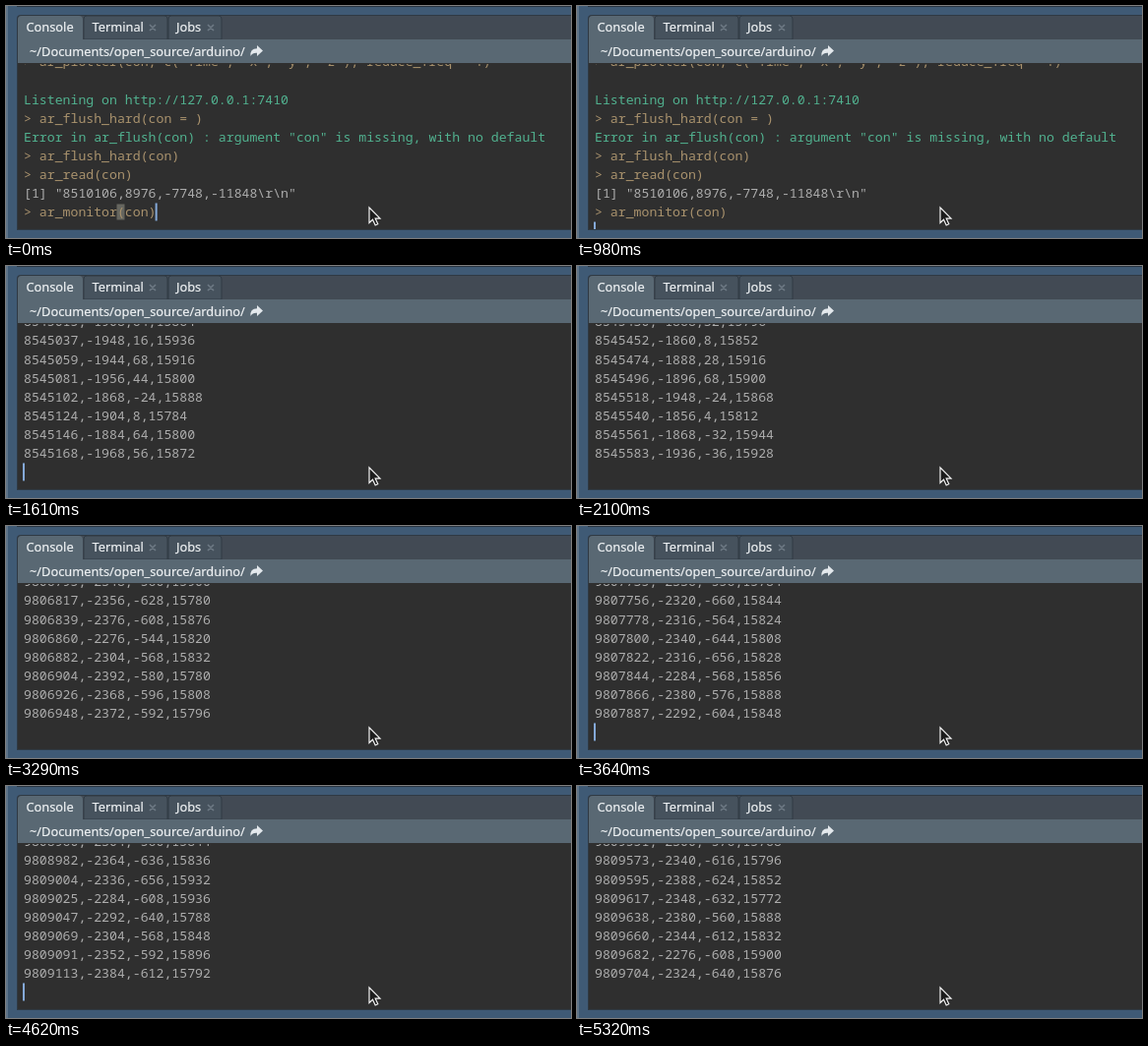
An HTML page that plays this animation: 574x236 px, repeating every 5.53 s.

```html
<!DOCTYPE html>
<html lang="en">
<head>
<meta charset="utf-8">
<title>Console monitor</title>
<style>
  html, body { margin: 0; width: 100%; height: 100%; overflow: hidden; background: #3f5a75; }
  svg { display: block; width: 574px; height: 236px; }
  text { white-space: pre; }
  .ui { font: 12.8px "Noto Sans", "Open Sans", sans-serif; fill: #eef1f3; stroke: #eef1f3; stroke-width: .2; }
  .mono { font: 13.2px "Noto Sans Mono", "DejaVu Sans Mono", monospace; }
  .input { fill: #a9926d; }
  .message { fill: #51b18f; }
  .output { fill: #adadad; }
</style>
</head>
<body>
<svg viewBox="0 0 574 236">
  <clipPath id="view"><rect x="12" y="59" width="562" height="168"/></clipPath>
  <rect width="574" height="236" fill="#3f5a75"/>
  <path d="M0 0h2v236H0z" fill="#5f7488"/>
  <path d="M11 0H574V1H11z" fill="#27333f"/>
  <path d="M11 228V13q0-4 4-4H574V228z" fill="#2f3943"/>
  <path d="M12 35V14q0-4 4-4H574V35z" fill="#424a54"/>
  <path d="M79 34V13q0-3 3-3h79q3 0 3 3v21zM165 34V13q0-3 3-3h48q3 0 3 3v21z" fill="#46525d" stroke="#303b45"/>
  <path d="M12 58V14q0-4 4-4H74q4 0 4 4V34H574V58z" fill="#596873"/>
  <rect x="12" y="58" width="562" height="169" fill="#2f2f2f"/>
  <g class="ui">
    <text x="20.5" y="26">Console</text>
    <text x="87.5" y="26">Terminal</text>
    <text x="173" y="26">Jobs</text>
    <text x="24" y="51">~/Documents/open_source/arduino/</text>
  </g>
  <path d="M146 19l6 6m0-6l-6 6M205 19l6 6m0-6l-6 6" stroke="#6d7984" stroke-width="1.6"/>
  <path d="M255 40l6 5.5-6 5.5v-3.2q-4.5-.4-6.5 3.2-1-7.5 6.5-7.8z" fill="#e3e8ec"/>
  <g clip-path="url(#view)">
    <g id="scroll">
      <rect id="paren" x="112.5" y="201.500" width="8" height="16" fill="#66665f"/>
      <g id="lines" class="mono"></g>
      <rect id="caret" width="2" height="18" fill="#84a9d8"/>
    </g>
  </g>
  <path d="M369 205v15.500l3.500-3.300 2.700 5.800 2.600-1.200-2.600-5.600h4.800z" fill="#1c1c1c" stroke="#f2f2f2" stroke-width="1.2"/>
</svg>
<script>
const LOOP = 5530, ROWS = 9, LINE = 19.08, CHAR = 7.92, STEP = 21.85;
const $ = id => document.getElementById(id);
const baseline = row => 214 - LINE * (ROWS - 1 - row);

const session = [
  '> ar_plotter(con, c("Time", "x", "y", "z"), reduce_freq = T)',
  '',
  'Listening on http://127.0.0.1:7410',
  '> ar_flush_hard(con = )',
  'Error in ar_flush(con) : argument "con" is missing, with no default',
  '> ar_flush_hard(con)',
  '> ar_read(con)',
  '[1] "8510106,8976,-7748,-11848\\r\\n"',
  '> ar_monitor(con)',
];

// Seeded sensor values: multiples of 4 scattered around a mean
const noise = n => { const v = Math.sin(n * 12.9898) * 43758.5453; return v - Math.floor(v); };
const vary = (mean, spread, seed) => mean + 4 * Math.round((noise(seed) - .5) * spread / 2);

function reading(stamp) {
  const [x, y] = stamp < 9e6 ? [-1912, 20] : [-2332, -600];
  return [stamp, vary(x, 60, stamp), vary(y, 60, stamp + .3), vary(15856, 90, stamp + .7)].join();
}

const stream = (start, count) =>
  Array.from({ length: count }, (_, i) => reading(Math.floor(start + STEP * i)));

const screen = (at, lines, caret = true, extra = {}) =>
  ({ at, lines, caret, row: ROWS - 1, col: 0, shift: 0, ...extra });
const begin = (at, count, caret) =>
  screen(at, [...session, ...stream(8544797, count), ''].slice(-ROWS), caret);
const feed = (at, start, caret) => screen(at, stream(start, ROWS - 1), caret);

const screens = [
  screen(0, session, true, { col: 17, paren: true }),
  screen(210, session, true, { col: 17 }),
  screen(560, session, false),
  screen(980, session, true, { row: ROWS }),
  screen(1050, session, true, { row: ROWS, shift: LINE / 2 }),
  begin(1120, 0),
  begin(1190, 1),
  begin(1260, 2),
  begin(1330, 4),
  begin(1540, 14, false),
  begin(1610, 18),
  feed(2100, 8545430.8, false),
  feed(3290, 9806795.35, false),
  feed(3360, 9807276),
  feed(3640, 9807735),
  feed(4060, 9808282.65),
  feed(4340, 9808610.4, false),
  feed(4620, 9808960.35),
  feed(4970, 9809266.25),
  feed(5320, 9809551.5, false),
];

const rows = Array.from({ length: ROWS }, (_, i) => {
  const row = document.createElementNS('http://www.w3.org/2000/svg', 'text');
  row.setAttribute('x', 18);
  row.setAttribute('y', baseline(i));
  return $('lines').appendChild(row);
});

const kind = line => line[0] === '>' ? 'input' : /^[LE]/.test(line) ? 'message' : 'output';
const show = (id, on) => $(id).setAttribute('visibility', on ? 'visible' : 'hidden');

function draw(s) {
  rows.forEach((row, i) => {
    const line = s.lines[i] || '';
    row.textContent = line;
    row.setAttribute('class', kind(line));
  });
  $('scroll').setAttribute('transform', `translate(0 ${-s.shift})`);
  $('caret').setAttribute('x', 17 + s.col * CHAR);
  $('caret').setAttribute('y', baseline(s.row) - 13.5);
  show('caret', s.caret);
  show('paren', s.paren);
}

let current;
function tick() {
  const t = performance.now() % LOOP;
  const next = screens.findLast(s => s.at <= t);
  if (next !== current) draw(current = next);
  requestAnimationFrame(tick);
}
tick();
</script>
</body>
</html>
```
